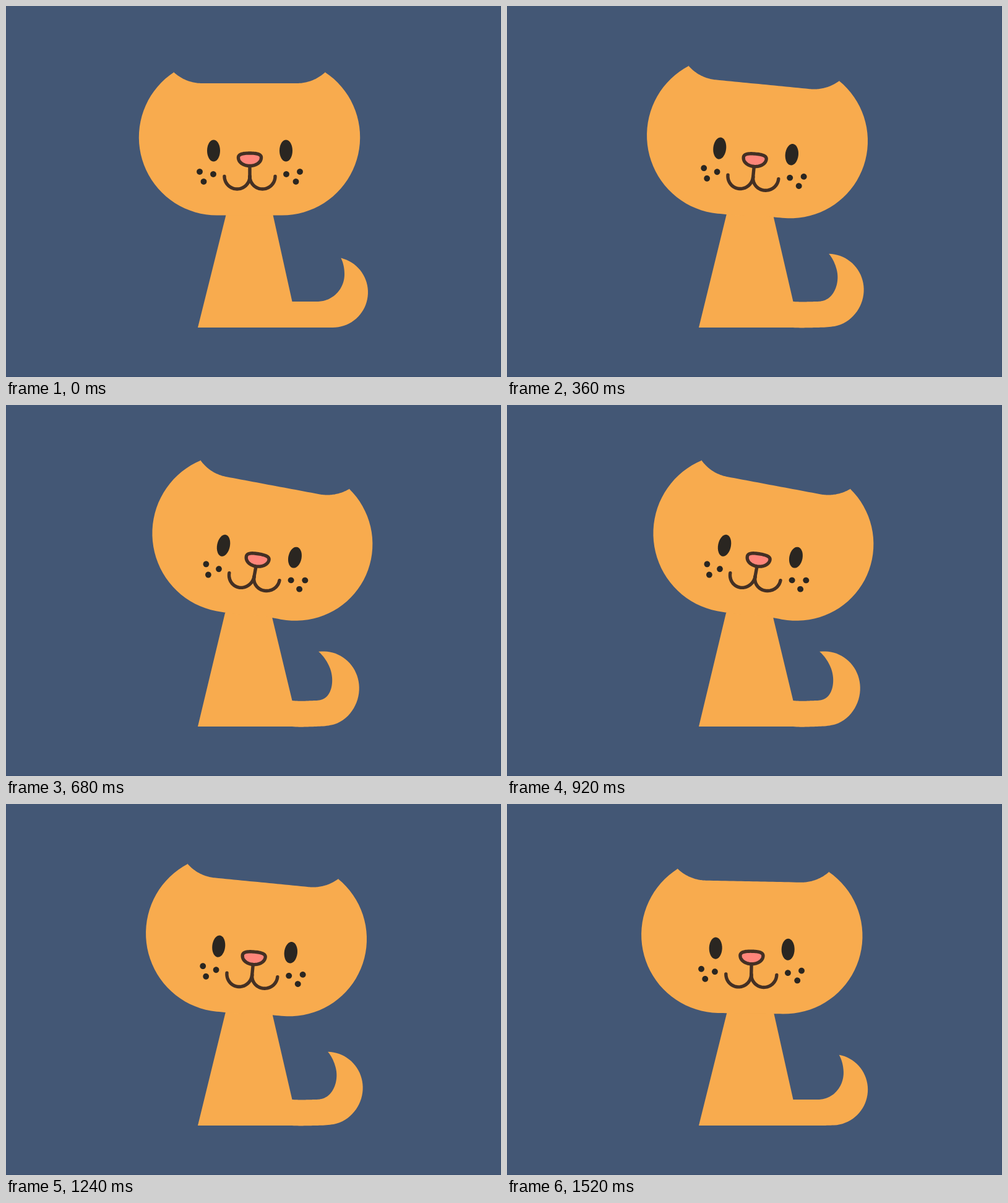
An HTML page with a canvas that plays this animation: 800x600 px, repeating every 1560 ms.

```html
<!DOCTYPE html>
<html lang="en">
<head>
<meta charset="utf-8">
<title>Cat</title>
<style>
  html, body { margin: 0; width: 100%; height: 100%; overflow: hidden; background: #435775; }
  canvas { display: block; }
</style>
</head>
<body>
<canvas id="stage" width="800" height="600"></canvas>
<script>
const ctx = document.getElementById('stage').getContext('2d');
const LOOP = 1560, STEP = 40;
const BACK = '#435775', FUR = '#f8ab4e', DARK = '#2a2621', LINE = '#443024', PINK = '#ff857a';
const RAD = Math.PI / 180;

// Point generators
const arc = (cx, cy, rx, ry, from, to, n = 36) =>
  Array.from({ length: n + 1 }, (_, i) => {
    const a = (from + (to - from) * i / n) * RAD;
    return [cx + rx * Math.cos(a), cy + ry * Math.sin(a)];
  });

const line = (x1, y1, x2, y2, n = 24) =>
  Array.from({ length: n + 1 }, (_, i) => [x1 + (x2 - x1) * i / n, y1 + (y2 - y1) * i / n]);

const bezier = (a, b, c, d, n = 16) =>
  Array.from({ length: n + 1 }, (_, i) => {
    const t = i / n, s = 1 - t;
    return [0, 1].map(k =>
      s * s * s * a[k] + 3 * s * s * t * b[k] + 3 * s * t * t * c[k] + t * t * t * d[k]);
  });

const mirror = pts => pts.map(([x, y]) => [788 - x, y]).reverse();
const disc = (x, y, rx, ry = rx) => arc(x, y, rx, ry, 0, 360);

// Shapes at rest
const head = [
  ...arc(317, 57.3, 67.7, 67.7, 133.4, 90),
  ...line(317, 125, 470, 125),
  ...arc(470, 57.3, 67.7, 67.7, 90, 46.6),
  ...arc(446, 212.3, 126.2, 126.2, -56.6, 90),
  ...line(446, 338.5, 341, 338.5),
  ...arc(341, 212.3, 126.2, 126.2, 90, 236.6)
];

const tail = [
  ...line(462.5, 478, 503, 478),
  ...arc(503, 434, 44, 44, 90, 0),
  ...bezier([547, 434], [547, 424], [545, 415], [541.5, 408]),
  ...arc(528, 463, 57, 57, -76.3, 90),
  ...line(528, 520, 462.5, 520)
];

const noseRight = [
  ...bezier([394, 238], [405, 238], [412.5, 239.5], [412.5, 245]),
  ...bezier([412.5, 245], [412.5, 253], [404, 258.5], [394, 258.5])
];
const nose = [...noseRight, ...mirror(noseRight)];

const mouth = [
  line(394, 260, 394, 278),
  arc(373.5, 275.5, 20.5, 20.5, 180, 0),
  arc(414.5, 275.5, 20.5, 20.5, 180, 0)
];

const spots = [
  disc(335.5, 234, 10.5, 17.5), disc(452.5, 234, 10.5, 17.5),
  disc(313, 268, 4.9), disc(335, 272, 4.9), disc(319.5, 284, 4.9),
  disc(475, 268, 4.9), disc(453, 272, 4.9), disc(468.5, 284, 4.9)
];

function turn(x, y, cx, cy, degrees) {
  const c = Math.cos(degrees * RAD), s = Math.sin(degrees * RAD);
  return [cx + (x - cx) * c - (y - cy) * s, cy + (x - cx) * s + (y - cy) * c];
}

// The head bends around the neck, more freely away from it.
const bendHead = k => ([x, y]) => {
  const r = Math.hypot(x - 393, y - 340), free = r / (r + 35);
  const [px, py] = turn(x, y, 393, 340, 12.3 * free * k);
  return [px - 3 * free * k, py + 1.3 * k];
};

// The tail curls in from its root towards its tip.
const bendTail = k => ([x, y]) => {
  const r = Math.hypot(x - 500, y - 500);
  const u = Math.min(1, Math.max(0, (x - 460) / 45));
  const free = u * u * (3 - 2 * u) * r ** 3 / (r ** 3 + 45 ** 3);
  return turn(x, y, 500, 500, -23 * free * k * (1.28 - 0.28 * k));
};

function trace(pts) {
  ctx.beginPath();
  pts.forEach(([x, y]) => ctx.lineTo(x, y));
}

function fill(pts, color) {
  trace(pts);
  ctx.closePath();
  ctx.fillStyle = color;
  ctx.fill();
}

function stroke(pts, closed) {
  trace(pts);
  if (closed) ctx.closePath();
  ctx.strokeStyle = LINE;
  ctx.lineWidth = 5.4;
  ctx.lineCap = ctx.lineJoin = 'round';
  ctx.stroke();
}

function draw(time) {
  // Steady tilt to one side and back; 1 is a tilt of about 11 degrees.
  const k = Math.max(0, Math.min(time - 6, 1594 - time)) / 674;
  const onHead = bendHead(k), onTail = bendTail(k);

  ctx.fillStyle = BACK;
  ctx.fillRect(0, 0, 800, 600);
  ctx.strokeStyle = '#3d5070';
  ctx.lineWidth = 1;
  ctx.strokeRect(0.5, -2, 799, 601.5);

  fill([
    [310, 520], [355.5 - 1.5 * k, 338 - 1.5 * k], [375, 315],
    [412, 315], [431.5 - 1.5 * k, 338 + 5 * k],
    ...tail.map(onTail)
  ], FUR);
  fill(head.map(onHead), FUR);

  spots.forEach(s => fill(s.map(onHead), DARK));
  mouth.forEach(m => stroke(m.map(onHead), false));
  const bentNose = nose.map(onHead);
  fill(bentNose, PINK);
  stroke(bentNose, true);
}

function tick() {
  draw(Math.floor(performance.now() % LOOP / STEP) * STEP);
  requestAnimationFrame(tick);
}
tick();
</script>
</body>
</html>
```
